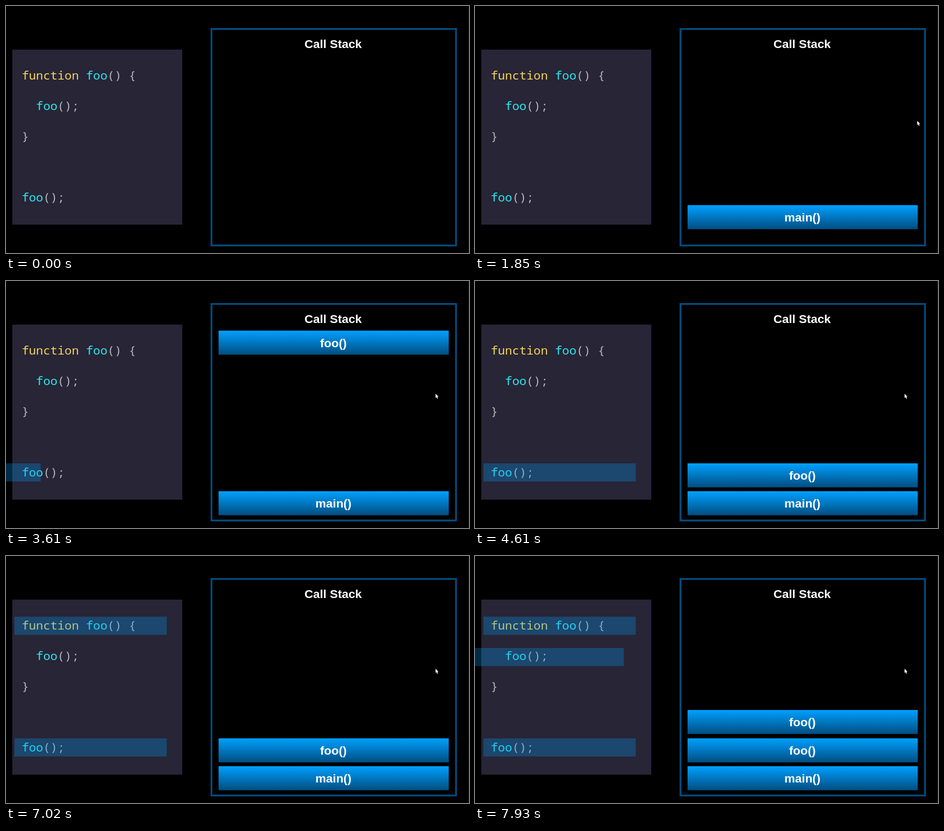
An HTML page with a canvas that plays this animation: 880x470 px, repeating every 8 s.

```html
<!DOCTYPE html>
<html lang="en">
<head>
<meta charset="utf-8">
<title>Call stack</title>
<style>
  html, body { margin: 0; width: 100%; height: 100%; overflow: hidden; background: #000; }
  canvas { display: block; }
</style>
</head>
<body>
<canvas id="stage" width="880" height="470"></canvas>
<script>
const ctx = document.getElementById('stage').getContext('2d');
const LOOP = 8000;

// The picture is held between these moments.
const TICKS = [
  0, 400, 520, 640, 920, 1040, 1180, 1320, 1470, 1610, 1730, 1850, 1970, 2120, 2240, 2390,
  3350, 3490, 3610, 3760, 3910, 4070, 4220, 4340, 4460, 4610,
  5290, 5410, 5560, 5680, 5830, 5950, 6100, 6220, 6340, 6490,
  7020, 7140, 7260, 7400, 7520, 7640, 7780, 7930
];

const LABEL_FONT = 'bold 22.8px "Liberation Sans", Arial, sans-serif';
const CODE_FONT = '500 22.6px "Noto Sans Mono", "DejaVu Sans Mono", monospace';
const YELLOW = '#f8d45a', CYAN = '#2ee9f1', GREY = '#b7b7b7';
const CODE_X = 30, CODE_Y = 140, CELL = 13.56, ROW = 58;

// Each token: row, column, text, colour.
const CODE = [
  [0, 0, 'function', YELLOW], [0, 9, 'foo', CYAN], [0, 12, '() {', GREY],
  [1, 2, 'foo', CYAN], [1, 5, '();', GREY],
  [2, 0, '}', GREY],
  [4, 0, 'foo', CYAN], [4, 3, '();', GREY]
];

// Calls drop in, overshoot a little and settle: [time, top].
const CALLS = [
  { label: 'main()', path: [[860, -46], [1040, 20], [1180, 78], [1320, 148], [1470, 214],
    [1850, 379], [1970, 413.5], [2120, 407], [2240, 401], [2390, 400]] },
  { label: 'foo()', path: [[3390, -46], [3490, 15], [3610, 94.5], [3760, 181], [3910, 274],
    [4070, 352], [4220, 349], [4460, 347]] },
  { label: 'foo()', path: [[7040, -46], [7140, 14], [7260, 71], [7640, 271], [7780, 303],
    [7930, 293]] }
];

const MARKS = [
  { start: 3457, y: 347 },
  { start: 5337, y: 115.5 },
  { start: 7098, y: 175 }
];
const MARK_TIME = 1105, MARK_W = 289.5, MARK_RIGHT = 305.5;

// Pointer stretches: x and y while visible.
const POINTER = [
  { until: 1320, path: [[400, 767, 264], [520, 798, 260], [640, 825, 255], [1040, 825, 255], [1180, 834, 247]] },
  { until: LOOP, path: [[1850, 840, 218], [1970, 830, 216], [2120, 816, 214]] }
];

function along(path, t, i = 1) {
  if (t <= path[0][0]) return path[0][i];
  for (let k = 1; k < path.length; k++) {
    const a = path[k - 1], b = path[k];
    if (t <= b[0]) return a[i] + (b[i] - a[i]) * (t - a[0]) / (b[0] - a[0]);
  }
  return path[path.length - 1][i];
}

function box(x, y, w, h, fill) {
  ctx.fillStyle = fill;
  ctx.fillRect(x, y, w, h);
}

function label(text, x, y) {
  ctx.font = LABEL_FONT;
  ctx.textAlign = 'center';
  ctx.fillStyle = '#fff';
  ctx.fillText(text, x, y);
}

function drawCode() {
  box(12, 83, 323, 333, '#272536');
  ctx.font = CODE_FONT;
  ctx.textAlign = 'left';
  for (const [row, col, text, color] of CODE) {
    ctx.fillStyle = color;
    [...text].forEach((ch, i) =>
      ctx.fillText(ch, CODE_X + (col + i) * CELL, CODE_Y + row * ROW));
  }
}

function drawMark({ start, y }, t) {
  if (t <= start) return;
  const p = Math.min(1, (t - start) / MARK_TIME);
  const right = MARK_RIGHT * Math.sin(p * Math.PI / 2);
  box(right - MARK_W, y, MARK_W, 34.5, 'rgba(0,158,255,0.28)');
}

function drawStack() {
  ctx.strokeStyle = '#004d80';
  ctx.lineWidth = 3.4;
  ctx.strokeRect(390.5, 43.7, 464.8, 412);
  label('Call Stack', 621.8, 80);
}

function drawCall({ label: text, path }, t) {
  if (t <= path[0][0]) return;
  const top = along(path, t);
  const fill = ctx.createLinearGradient(0, top, 0, top + 46);
  fill.addColorStop(0, '#00a0ff');
  fill.addColorStop(1, '#004d80');
  box(404, top, 437.5, 45.7, fill);
  label(text, 622.3, top + 31);
}

function drawPointer(t) {
  const leg = POINTER.find(p => t >= p.path[0][0] && t < p.until);
  if (!leg) return;
  ctx.save();
  ctx.translate(along(leg.path, t, 1), along(leg.path, t, 2));
  ctx.beginPath();
  [[0.5, 0.5], [0.5, 8.5], [2.3, 7], [3.6, 10], [5, 9.4], [3.8, 6.5], [6, 6.3]]
    .forEach(([x, y]) => ctx.lineTo(x, y));
  ctx.closePath();
  ctx.strokeStyle = '#000';
  ctx.lineWidth = 1;
  ctx.stroke();
  ctx.fillStyle = '#fff';
  ctx.fill();
  ctx.restore();
}

function draw(t) {
  box(0, 0, 880, 470, '#000');
  box(879, 0, 1, 470, '#222');
  drawCode();
  MARKS.forEach(m => drawMark(m, t));
  drawStack();
  CALLS.forEach(c => drawCall(c, t));
  drawPointer(t);
}

const begin = performance.now();

function frame() {
  const t = (performance.now() - begin) % LOOP;
  draw(TICKS.filter(k => k <= t).pop());
  requestAnimationFrame(frame);
}
frame();
</script>
</body>
</html>
```
